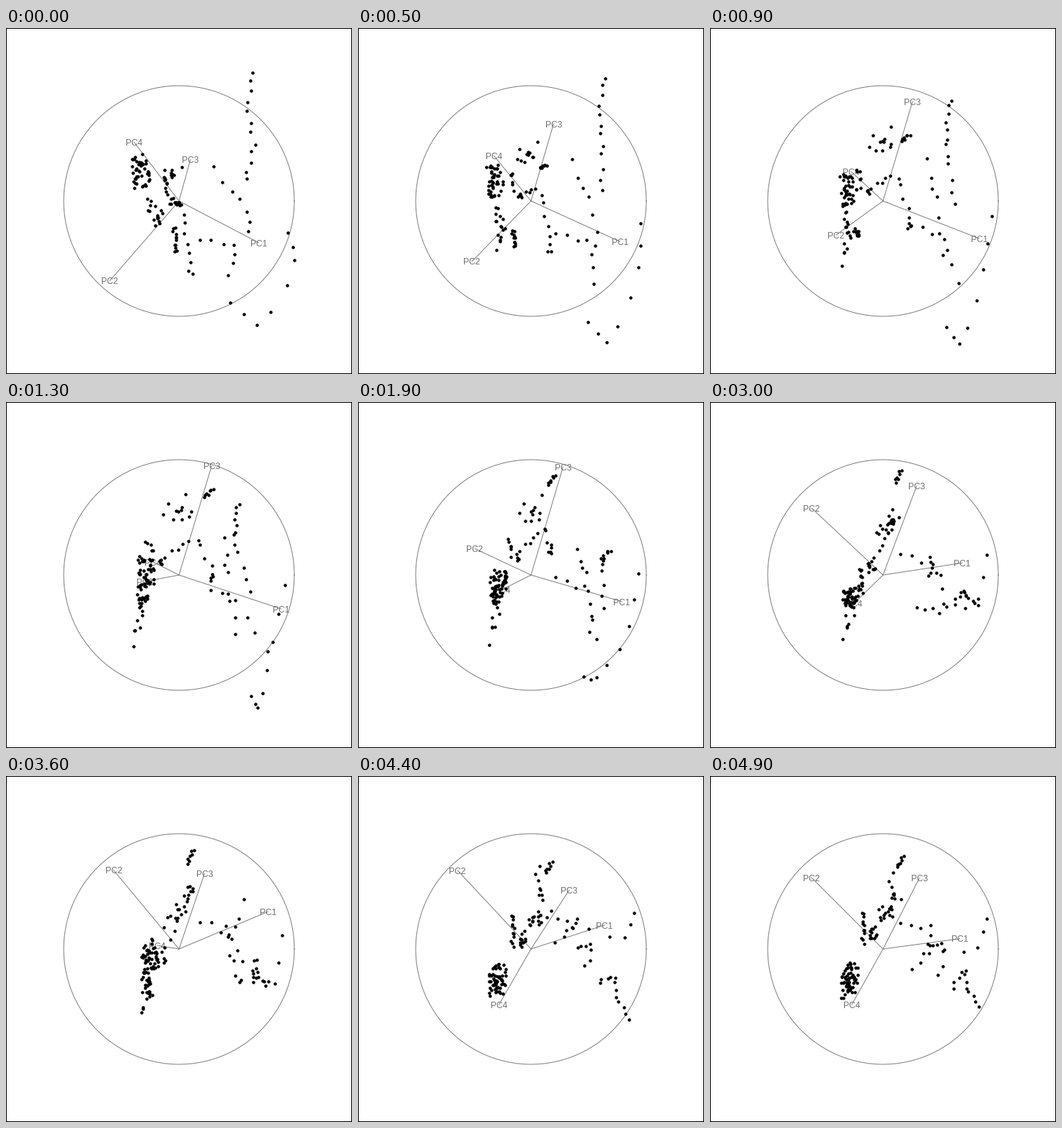
Animation, 480 px wide and 480 px high, one loop 5000 ms. Source, as a matplotlib script:

```python
import numpy as np
import matplotlib.pyplot as plt
from matplotlib.animation import FuncAnimation

SIZE, RADIUS, DPI = 480, 160, 100
FRAMES, INTERVAL = 50, 100
PX = 72 / DPI
GREY = "#7f7f7f"
rng = np.random.default_rng(11)

# Tips of PC1..PC4 on the unit disc where the tour changes direction.
TURNS = {
    0: [(.69, -.36), (-.60, -.69), (.10, .36), (-.39, .51)],
    13: [(.881, -.294), (-.294, -.056), (.281, .944), (-.225, .113)],
    26: [(.62, -.08), (-.675, .50), (.30, .78), (-.28, -.40)],
    36: [(.769, .319), (-.569, .681), (.219, .65), (-.188, .031)],
    45: [(.62, .185), (-.65, .673), (.34, .48), (-.285, -.535)],
    49: [(.663, .088), (-.619, .619), (.313, .613), (-.269, -.481)],
}
TIMES = np.array(list(TURNS))
TIPS = np.array(list(TURNS.values()))


def basis(frame):
    """Orthonormal 4x2 projection on the way between two turns."""
    i = min(np.searchsorted(TIMES, frame, side="right") - 1, len(TIMES) - 2)
    u = (frame - TIMES[i]) / (TIMES[i + 1] - TIMES[i])
    left, _, right = np.linalg.svd((1 - u) * TIPS[i] + u * TIPS[i + 1],
                                   full_matrices=False)
    return left @ right


def strand(count, jitter, *waypoints):
    """Points strewn evenly, with noise, along a path through the views."""
    t = np.linspace(0, len(waypoints) - 1, count)
    path = [np.interp(t, range(len(waypoints)), axis)
            for axis in zip(*waypoints)]
    return np.transpose(path) + rng.uniform(-jitter, jitter, (count, 4))


# Each waypoint gives start x, start y, early x and late y in pixels;
# together these four views fix a place in PC space.
VIEWS = np.column_stack([basis(0), basis(13)[:, 0], basis(44)[:, 1]])
observations = np.vstack([
    # loose arms on the right
    strand(12, 3, (104, 178, 83, -95), (92, 130, 78, -70),
           (105, 75, 77, -35), (92, 30, 100, -44)),
    strand(7, 4, (51, 44, 63, 0), (88, 0, 68, 10), (99, -38, 80, -25)),
    strand(7, 3, (29, -56, 46, 45), (79, -60, 80, 40), (70, -103, 121, 24)),
    strand(8, 2, (150, -42, 148, 51), (164, -90, 126, 12),
           (115, -178, 112, 34), (73, -141, 98, 7)),
    # dense body and its tails
    strand(42, 12, (-57, 60, -46, -58), (-50, 18, -46, -34)),
    strand(16, 6, (-44, 0, -52, -25), (-28, -18, -54, -22),
           (-30, -28, -60, -55)),
    strand(12, 3, (-7, -35, -50, 5), (-5, -72, -44, 46)),
    strand(9, 7, (-20, 25, -44, 8), (-12, 0, -28, 10)),
    # crest
    strand(11, 8, (-22, 36, -14, 38), (0, 40, 14, 46)),
    strand(6, 2, (-12, -4, -26, 20), (0, -4, 12, 50)),
    strand(7, 3, (-4, -5, 35, 104), (2, -4, 46, 122)),
    strand(8, 3, (9, -18, 24, 70), (11, -70, 46, 82), (18, -104, 45, 112)),
])
data = np.linalg.solve(VIEWS.T, observations.T).T

fig = plt.figure(figsize=(SIZE / DPI, SIZE / DPI), dpi=DPI, facecolor="white")
ax = fig.add_axes([0, 0, 1, 1])
half = SIZE / 2
ax.set(xlim=(-half, half), ylim=(-half, half))
ax.axis("off")

# Centred on the stage edge, so one pixel of the line stays visible.
ax.add_patch(plt.Rectangle((-half, -half), SIZE, SIZE, fill=False,
                           ec="black", lw=2 * PX, snap=False, clip_on=False))
angle = np.linspace(0, 2 * np.pi, 101)
ax.plot(RADIUS * np.cos(angle), RADIUS * np.sin(angle), color=GREY, lw=PX)
spokes = [ax.plot([], [], color=GREY, lw=PX)[0] for _ in range(4)]
labels = [ax.text(0, 0, f"PC{k + 1}", color="#6f6f6f", fontsize=12 * PX,
                  family="Liberation Sans", ha="center", va="baseline")
          for k in range(4)]
dots, = ax.plot([], [], "o", color="black", ms=4.5 * PX, mew=0, zorder=5)


def update(frame):
    plane = basis(frame)
    for spoke, label, (x, y) in zip(spokes, labels, plane * RADIUS):
        spoke.set_data([0, x], [0, y])
        label.set_position((x, y - 4.7))
    dots.set_data(*(data @ plane).T)
    return [*spokes, *labels, dots]


animation = FuncAnimation(fig, update, frames=FRAMES, interval=INTERVAL,
                          repeat=True, repeat_delay=0)
plt.show()
```
